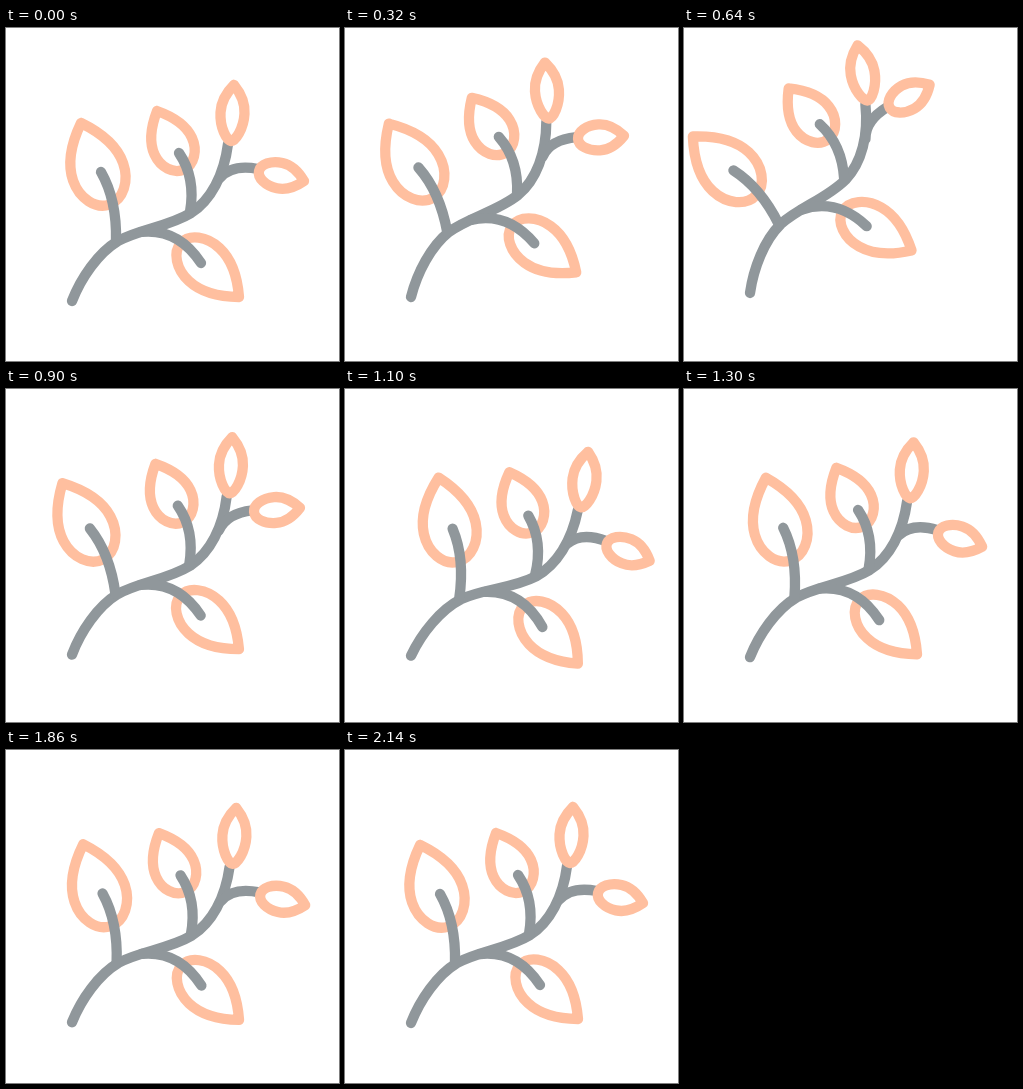
An HTML page with a canvas that plays this animation: 333x333 px, repeating every 2.16 s.

```html
<!DOCTYPE html>
<html lang="en">
<head>
<meta charset="utf-8">
<title>Swaying branch</title>
<style>
html, body { margin: 0; width: 100%; height: 100%; overflow: hidden; background: #fff; }
canvas { display: block; width: 333px; height: 333px; }
</style>
</head>
<body>
<canvas id="stage"></canvas>
<script>
const SIZE = 333, LOOP = 2160, GRAY = '#90979b', PEACH = '#ffbf9f';
const canvas = document.getElementById('stage');
const ctx = canvas.getContext('2d');
const dpr = window.devicePixelRatio || 1;
canvas.width = canvas.height = Math.round(SIZE * dpr);

// Damped swings as [time, degrees] turning points; WHIP trails behind SWAY.
const SWAY = [[0, 0], [620, -13.5], [1050, 4.3], [1500, -2.3], [1880, 0.6], [LOOP, 0]];
const WHIP = [[80, 0], [720, -15], [1180, 4.2], [1600, -3.6], [1960, 1], [LOOP, 0]];
const LIFT = [[0, 0], [640, -8], [LOOP, 0]];

// The branch at rest.
const ROOT = [66, 273], LOW_JOINT = [110, 213], HIGH_JOINT = [214, 150];
const stem = new Path2D('M66 273C75 250 92 225 112 213C134 201 162 199 185 185C205 172 218 147 222 116');
const twigs = {
  low: new Path2D('M110 213Q111 172 95 144'),
  mid: new Path2D('M184 184Q190 150 173 125'),
  under: new Path2D('M135 204Q172 200 195 235'),
  high: new Path2D('M214 150Q226 136 252 141')
};
const leaves = {
  low: leaf([75, 95], [103.5, 176.5], 26.5),
  mid: leaf([151, 83], [178, 141.5], 20.5),
  under: leaf([233, 269], [175, 215], 22.5),
  top: leaf([228, 57], [225, 113], 12, 0.5, 0.55, 0.35),
  high: leaf([298, 153], [253, 143], 13, 0.54, 0.5)
};

// half: half width; wide: widest place on the axis; tip, base: fullness of the ends.
function leaf([x, y], [bx, by], half, wide = 0.6, tip = 0.42, base = 0.55) {
  const path = new Path2D();
  const dx = bx - x, dy = by - y, k = half / Math.hypot(dx, dy);
  const at = (u, v) => [x + dx * u - dy * k * v, y + dy * u + dx * k * v];
  const round = wide + (1 - wide) * 0.55;
  for (const side of [1, -1]) {
    path.moveTo(x, y);
    path.bezierCurveTo(...at(0.13, tip * side), ...at(wide * 0.58, side), ...at(wide, side));
    path.bezierCurveTo(...at(round, side), ...at(1, base * side), bx, by);
  }
  return path;
}

function track(keys, t) {
  let i = 1;
  while (i < keys.length - 1 && t > keys[i][0]) i++;
  const [t0, v0] = keys[i - 1], [t1, v1] = keys[i];
  const p = Math.max(0, (t - t0) / (t1 - t0));
  return v0 + (v1 - v0) * (1 - Math.cos(Math.PI * p)) / 2;
}

function turn([x, y], degrees) {
  ctx.translate(x, y);
  ctx.rotate(degrees * Math.PI / 180);
  ctx.translate(-x, -y);
}

function stroke(color, ...paths) {
  ctx.strokeStyle = color;
  paths.forEach(path => ctx.stroke(path));
}

function swing(joint, degrees, color, ...paths) {
  ctx.save();
  turn(joint, degrees);
  stroke(color, ...paths);
  ctx.restore();
}

function draw(t) {
  const whip = track(WHIP, t);
  ctx.setTransform(dpr, 0, 0, dpr, 0, 0);
  ctx.fillStyle = '#fff';
  ctx.fillRect(0, 0, SIZE, SIZE);
  ctx.lineWidth = 10.3;
  ctx.lineCap = ctx.lineJoin = 'round';
  ctx.translate(0, track(LIFT, t));
  turn(ROOT, track(SWAY, t));

  swing(LOW_JOINT, whip, PEACH, leaves.low);
  stroke(PEACH, leaves.mid, leaves.under);
  stroke(GRAY, stem, twigs.mid, twigs.under);
  swing(LOW_JOINT, whip, GRAY, twigs.low);
  swing(HIGH_JOINT, whip * 2, GRAY, twigs.high);
  swing(HIGH_JOINT, whip * 2, PEACH, leaves.high);
  stroke(PEACH, leaves.top);
}

const start = performance.now();
function frame() {
  draw((performance.now() - start) % LOOP);
  requestAnimationFrame(frame);
}
frame();
</script>
</body>
</html>
```
